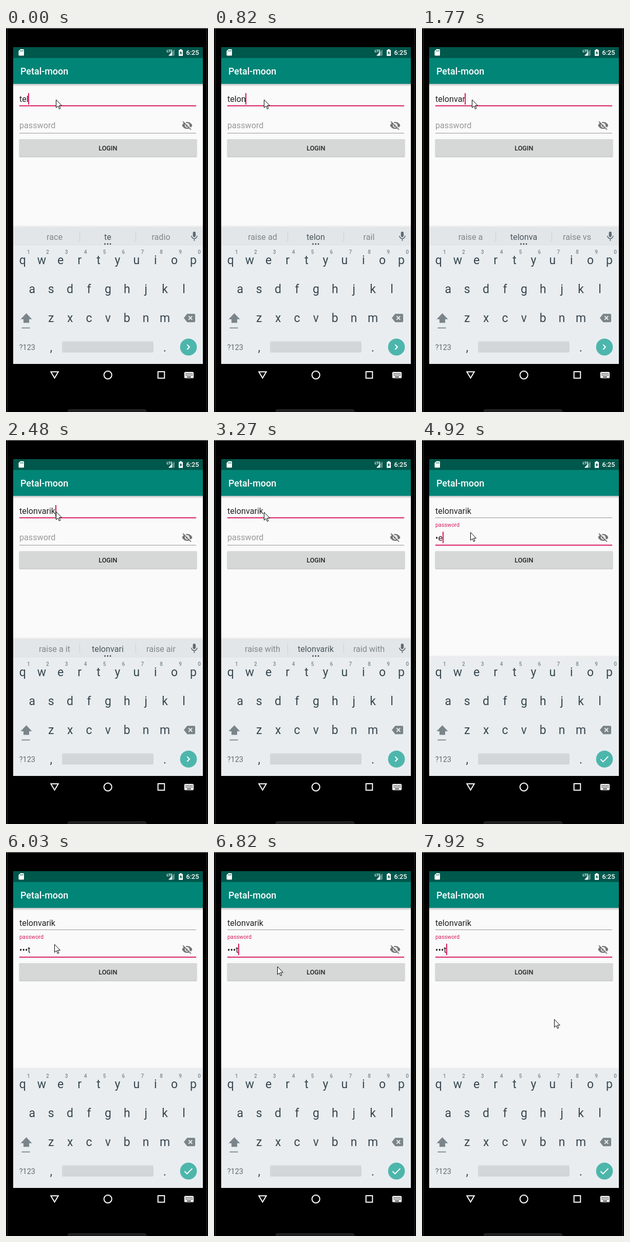
An HTML page for the animation above (8000 ms loop, 393 by 743 pixels).

```html
<!DOCTYPE html>
<html lang="en">
<head>
<meta charset="utf-8">
<title>Login screen</title>
<style>
  html, body { margin: 0; width: 100%; height: 100%; overflow: hidden; background: #000; }
  svg { display: block; width: 393px; height: 743px; font-family: Roboto, sans-serif; }
  text { white-space: pre; }
  .mid { text-anchor: middle; }
  .field { font-size: 16.16px; fill: #222; }
  .key { font-size: 23px; fill: #37474f; }
  .digit { font-size: 10px; font-weight: 500; fill: #7a858a; }
  .word { font-size: 16.16px; fill: #80888c; }
  .line { fill: none; stroke: #fff; stroke-width: 2; }
</style>
</head>
<body>
<svg viewBox="0 0 393 743">
  <defs>
    <linearGradient id="shade" x2="0" y2="1">
      <stop stop-color="#000" stop-opacity=".25"/>
      <stop offset="1" stop-color="#000" stop-opacity="0"/>
    </linearGradient>
    <linearGradient id="rise" x2="0" y2="1">
      <stop stop-color="#000" stop-opacity="0"/>
      <stop offset="1" stop-color="#000" stop-opacity=".07"/>
    </linearGradient>
  </defs>

  <!-- phone body -->
  <rect width="393" height="743"/>
  <path d="M2.5 1V743M390.5 1V743" stroke="#2b2b2b"/>
  <rect width="393" height="1" fill="#8c8c8c"/>
  <rect x="120.5" y="738.5" width="152" height="9" rx="3" fill="#1d1d1d" stroke="#383838"/>

  <!-- app bars -->
  <rect x="14" y="37" width="369" height="613" fill="#fafafa"/>
  <rect x="14" y="108" width="369" height="5" fill="url(#shade)"/>
  <rect x="14" y="37" width="369" height="21" fill="#00574b"/>
  <rect x="14" y="58" width="369" height="50" fill="#008577"/>
  <path d="M28 41H33.5Q35 41 35 42.5V52Q35 53.5 33.5 53.5H26Q24.5 53.5 24.5 52V44.5Z" fill="#fff"/>
  <path d="M28.5 43v2.5M30.7 43v2.5M32.9 43v2.5" stroke="#00574b"/>
  <text x="312.5" y="46.5" font-size="7" font-weight="700" fill="#fff" textLength="">LTE</text>
  <path d="M328 41V53.5H316Z" fill="#fff" fill-opacity=".35"/>
  <path d="M323 46.5V53.5H316Z" fill="#fff"/>
  <path d="M336 42.5H338.3V41H341.7V42.5H344V54H336Z" fill="#fff"/>
  <path d="M340.8 44L337.7 49H339.7V52.5L342.6 47.5H340.8Z" fill="#00574b"/>
  <text x="350.5" y="52.3" font-size="12.6" font-weight="500" fill="#fff">6:25</text>
  <text x="28" y="90" font-size="17.96" font-weight="500" fill="#fff">Petal-moon</text>

  <!-- form -->
  <text id="user" class="field" x="26" y="143.3"></text>
  <rect id="userLine" x="26" width="344"/>
  <text id="label" x="26">password</text>
  <text id="pass" class="field" x="26" y="194.5"></text>
  <rect id="passLine" x="26" width="344"/>
  <rect id="caret" width="2" height="22" fill="#d81b60"/>
  <g transform="translate(341.7 177.6) scale(.898)">
    <path d="M1 12C2.7 7.6 7 4.5 12 4.5S21.3 7.6 23 12C21.3 16.4 17 19.5 12 19.5S2.7 16.4 1 12Z" fill="#757575"/>
    <circle cx="12" cy="12" r="5" fill="#fafafa"/>
    <circle cx="12" cy="12" r="3" fill="#757575"/>
    <path d="M3.8 2L22.4 20.6" stroke="#fafafa" stroke-width="2.2"/>
    <path d="M2.6 3.6L20.4 21.4" stroke="#757575" stroke-width="1.9"/>
  </g>
  <rect x="25.5" y="215.5" width="346" height="35" rx="2" fill="#000" opacity=".1"/>
  <rect x="25.5" y="215" width="346" height="34.6" rx="2" fill="#000" opacity=".13"/>
  <rect x="26" y="215" width="345" height="33.5" rx="2" fill="#d6d7d7"/>
  <text class="mid" x="198.3" y="236.8" font-size="12.57" font-weight="500" fill="#222">LOGIN</text>

  <!-- keyboard -->
  <rect x="14" y="416" width="369" height="4" fill="url(#rise)"/>
  <rect x="14" y="420" width="369" height="230" fill="#e9edf0"/>
  <g id="strip">
    <rect x="14" y="381" width="369" height="4" fill="url(#rise)"/>
    <rect x="14" y="385" width="369" height="36" fill="#e2e6e9"/>
    <path d="M143.5 393V414M252.5 393V414" stroke="#cdd2d5"/>
    <text class="word mid" x="94.5" y="410"></text>
    <text class="word mid" x="198" y="410" style="fill:#4b575d"></text>
    <text class="word mid" x="301.5" y="410"></text>
    <g fill="#37474f">
      <circle cx="192.5" cy="418" r="1.4"/><circle cx="197.8" cy="418" r="1.4"/><circle cx="203" cy="418" r="1.4"/>
    </g>
    <rect x="363.6" y="394" width="5.4" height="10.5" rx="2.7" fill="#5f6b71"/>
    <path d="M360.8 402A5.5 5.5 0 0 0 371.8 402M366.3 407.5V412" fill="none" stroke="#5f6b71" stroke-width="1.6"/>
  </g>
  <g id="keys"></g>
  <path d="M39.5 552L50.5 563.5H45V570.5H34V563.5H28.5Z" fill="#7a858a"/>
  <rect x="30.5" y="579.5" width="16" height="1.8" fill="#7a858a"/>
  <path d="M352.5 553H366Q368 553 368 555V567.2Q368 569.2 366 569.2H352.5L346 561Z" fill="#7a858a"/>
  <path d="M355.3 557.5l7 7m0-7l-7 7" stroke="#e9edf0" stroke-width="1.8"/>
  <text class="mid" x="41.3" y="622.8" font-size="14.4" fill="#5f6b71">?123</text>
  <rect x="109" y="606.5" width="178" height="21.5" rx="2.5" fill="#d3d6d8"/>
  <circle cx="355" cy="617.4" r="16.3" fill="#4db6ac"/>
  <path id="action" class="line"/>

  <!-- navigation bar -->
  <path class="line" d="M87.3 665.3H101.7L94.5 677.3Z" stroke-width="1.8"/>
  <circle class="line" cx="198.2" cy="671.3" r="7.6"/>
  <rect class="line" x="295.7" y="665" width="12.6" height="12.6"/>
  <rect x="347" y="665.5" width="18" height="12" rx="1.5" fill="#fff"/>
  <path d="M349.5 668.7H363M349.5 671.7H363" stroke="#000" stroke-width="1.6" stroke-dasharray="1.7 1.2"/>
  <path d="M352 675.2H360" stroke="#000" stroke-width="1.4"/>

  <path id="mouse" d="M.5 .8V16.2L4.1 12.9 6.5 18.5 8.8 17.5 6.4 12.1H11.4Z" fill="#fff" stroke="#000"/>
</svg>
<script>
const LOOP = 8000, NAME = 'telonvarik', SECRET = 'test';
const FOCUS = 3820, FLOAT = 3970;
const PINK = '#d81b60';

// Timelines: [start in ms, value, ...]
const userLength = [[0, 3], [430, 4], [700, 5], [970, 6], [1650, 7], [1770, 8], [2040, 9], [2480, 10]];
const passLength = [[0, 0], [4800, 1], [4920, 2], [5350, 3], [5630, 4]];
const suggestions = [
  [0, 'race', 2, 'radio'], [150, 'raise', 3, 'raised'], [560, 'raise a', 4, 'raid'],
  [820, 'raise ad', 5, 'rail'], [1090, 'raise a', 6, 'rail'], [1770, 'raise a', 7, 'raise vs'],
  [1890, 'raise ai', 8, 'raise via'], [2160, 'raise a it', 9, 'raise air'], [2620, 'raise with', 10, 'raid with']
];
const blink = [[0, 1], [3120, 0], [3540, 1], [4400, 0], [4800, 1], [6030, 0], [6550, 1]];
const pointer = [
  [0, 97, 138], [3270, 97, 139], [3420, 94, 178], [6400, 104, 193], [6550, 116, 209],
  [6670, 122, 218], [6820, 123, 221], [7250, 262, 336], [7370, 357, 414], [7800, 300, 361], [7920, 257, 323]
];

const $ = id => document.getElementById(id);
const words = document.querySelectorAll('.word');
const at = (track, t) => track.findLast(step => step[0] <= t).slice(1);

function set(el, attrs) {
  for (const name in attrs) el.setAttribute(name, attrs[name]);
}

function addText(content, cls, x, y) {
  const el = document.createElementNS('http://www.w3.org/2000/svg', 'text');
  set(el, { class: cls + ' mid', x, y });
  el.textContent = content;
  $('keys').append(el);
}

[['qwertyuiop', 32.4], ['asdfghjkl', 50.8], ['zxcvbnm', 87.7]].forEach(([row, left], r) => {
  [...row].forEach((char, i) => {
    const x = left + i * 36.9;
    addText(char, 'key', x, 457 + r * 56);
    if (r === 0) addText((i + 1) % 10, 'digit', x + 11.5, 437);
  });
});
addText(',', 'key', 87.7, 626);
addText('.', 'key', 309, 626);

function underline(el, y, active) {
  set(el, { y: active ? y - .5 : y, height: active ? 2 : 1, fill: active ? PINK : '#979797' });
}

function draw(t) {
  const inPass = t >= FOCUS, floated = t >= FLOAT;
  const [typed] = at(userLength, t), [hidden] = at(passLength, t);
  $('user').textContent = NAME.slice(0, typed);
  $('pass').textContent = hidden ? '•'.repeat(hidden - 1) + SECRET[hidden - 1] : '';
  underline($('userLine'), 150, !inPass);
  underline($('passLine'), 203, inPass);
  set($('label'), floated
    ? { y: 168, 'font-size': 10.8, fill: PINK }
    : { y: 193.7, 'font-size': 16.16, fill: '#999' });

  const width = $(inPass ? 'pass' : 'user').getComputedTextLength();
  set($('caret'), { x: Math.round(25.5 + width), y: inPass ? 177.5 : 126, opacity: at(blink, t)[0] });

  const [left, count, right] = at(suggestions, t);
  [left, NAME.slice(0, count), right].forEach((word, i) => words[i].textContent = word);
  $('strip').style.display = floated ? 'none' : '';
  $('action').setAttribute('d', floated ? 'M347.5 617.8L352.3 622.6L362.3 612.4' : 'M352.3 612.8L357 617.4L352.3 622');

  const [x, y] = at(pointer, t);
  $('mouse').setAttribute('transform', `translate(${x} ${y})`);
}

let start;
function tick(now) {
  start ??= now;
  draw((now - start) % LOOP);
  requestAnimationFrame(tick);
}
draw(0);
requestAnimationFrame(tick);
</script>
</body>
</html>
```
